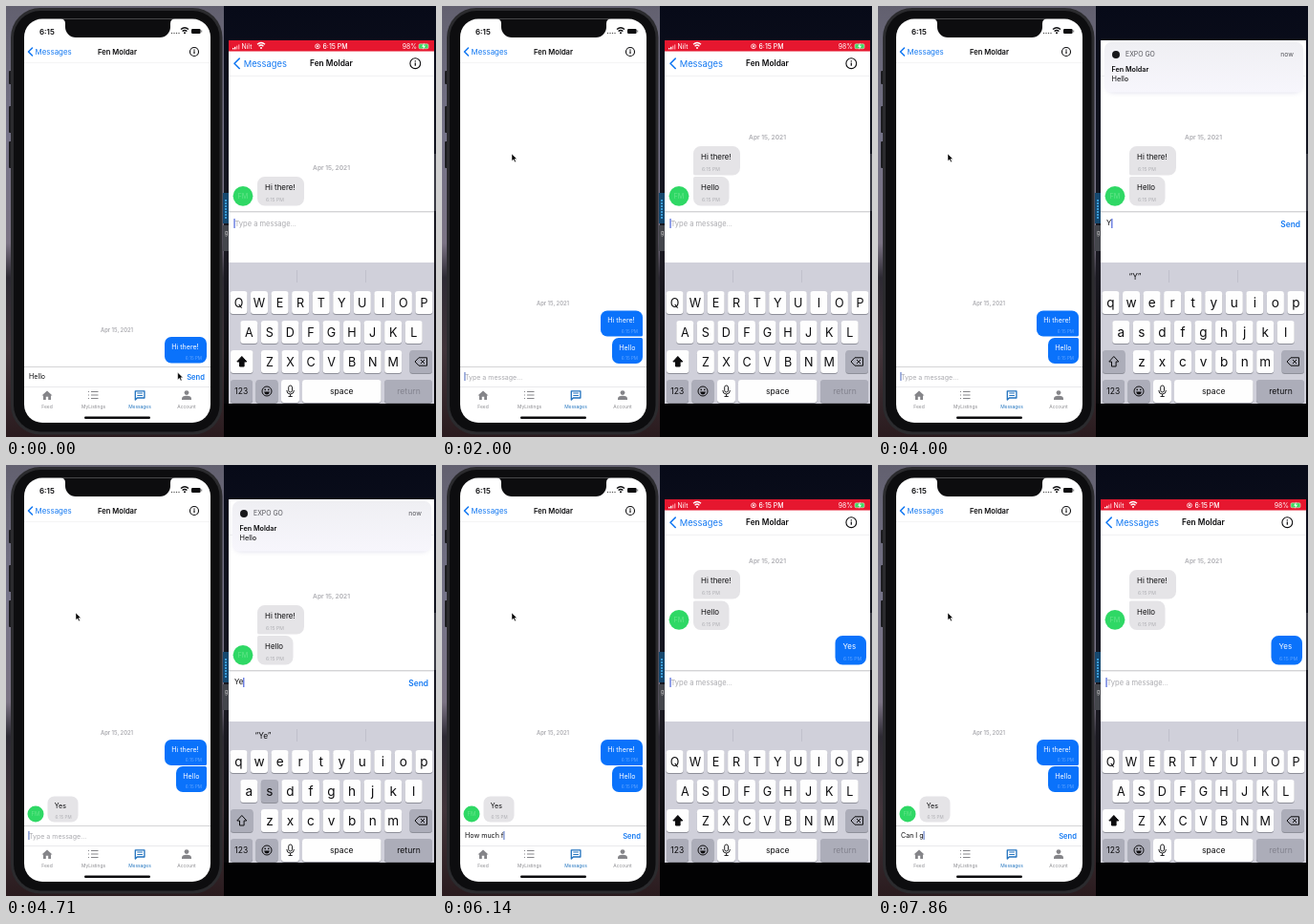
Recreate the animation shown at these times as an HTML page. Size 450x452 px, loop 8000 ms.

```html
<!DOCTYPE html>
<html lang="en">
<head>
<meta charset="utf-8">
<title>Chat on two phones</title>
<style>
  html, body { margin: 0; width: 100%; height: 100%; overflow: hidden; background: #000; }
  svg { display: block; width: 100%; height: 100%; font-family: Inter, Roboto, sans-serif; }
  text { white-space: pre; }
</style>
</head>
<body>
<svg id="stage" viewBox="0 0 450 452"></svg>
<script>
const LOOP = 8000;
const BLUE = '#0a72fb', LINK = '#1479f2', GREY = '#e5e4e7', GREEN = '#2fd865', INK = '#0c0c0e';
const KEY = '#fefefe', DARK_KEY = '#acadb9', BEZEL = '#0d0d0f';
const CONTACT = 'Fen Moldar', INITIALS = 'FM', CARRIER = 'Nilt', DAY = 'Apr 15, 2021';
const $ = id => document.getElementById(id);

// ---- drawing helpers; text is centred vertically on y ----
const text = (x, y, size, str, fill = INK, anchor = 'start', more = '') =>
  `<text x="${x}" y="${y + size * .36}" font-size="${size}" fill="${fill}" text-anchor="${anchor}" ${more}>${str}</text>`;
const rect = (x, y, w, h, fill, rx = 0, more = '') =>
  `<rect x="${x}" y="${y}" width="${w}" height="${h}" rx="${rx}" fill="${fill}" ${more}/>`;
const circle = (x, y, r, fill, more = '') => `<circle cx="${x}" cy="${y}" r="${r}" fill="${fill}" ${more}/>`;
const line = (d, stroke, w = 1, more = '') =>
  `<path d="${d}" fill="none" stroke="${stroke}" stroke-width="${w}" ${more}/>`;
const shape = (d, fill, more = '') => `<path d="${d}" fill="${fill}" ${more}/>`;
const group = (id, body, more = '') => `<g id="${id}" ${more}>${body}</g>`;
const bold = 'font-weight="600"';

// corner radii: top left, top right, bottom right, bottom left
const rounded = (x, y, w, h, [a, b, c, d]) =>
  `M${x + a} ${y}h${w - a - b}a${b} ${b} 0 0 1 ${b} ${b}v${h - b - c}a${c} ${c} 0 0 1 ${-c} ${c}` +
  `h${c + d - w}a${d} ${d} 0 0 1 ${-d} ${-d}v${d + a - h}a${a} ${a} 0 0 1 ${a} ${-a}z`;

function bubble(x, y, w, h, str, mine, scale, radii) {
  const ink = mine ? '#fff' : INK, faint = mine ? '#62a5ff' : '#aeaeb3';
  const stamp = mine ? [x + w - 5, 'end'] : [x + 8 * scale, 'start'];
  return shape(rounded(x, y, w, h, radii.map(r => r * scale)), mine ? BLUE : GREY) +
    text(x + 7.3 * scale, y + h * .37, 7.1 * scale, str, ink) +
    text(stamp[0], y + h * .8, 4.6 * scale, '6:15 PM', faint, stamp[1]);
}

const avatar = (x, y, r) => circle(x, y, r, GREEN) + text(x, y, r * .7, INITIALS, '#62e488', 'middle');
const info = (x, y, r) => circle(x, y, r, 'none', `stroke="${INK}" stroke-width="1.1"`) +
  line(`M${x} ${y - .8}v${r * .6}M${x} ${y - r * .55}v1.2`, INK, 1.2);
const wifi = (x, y, fill) => line(`M${x - 4} ${y - 2}q4 -3.6 8 0M${x - 2.4} ${y}q2.4 -2.2 4.8 0`, fill, 1.4) +
  circle(x, y + 1.7, 1, fill);
const chevron = (x, y, r) => line(`M${x + r} ${y - r}l${-r} ${r}l${r} ${r}`, LINK, 1.6,
  'stroke-linecap="round" stroke-linejoin="round"');

// ---- backdrop ----
function backdrop() {
  return `<defs>
    <linearGradient id="sky" x2="0" y2="1"><stop stop-color="#62606f"/><stop offset=".3" stop-color="#757388"/>
      <stop offset=".55" stop-color="#7b7384"/><stop offset=".63" stop-color="#2d2a33"/>
      <stop offset=".8" stop-color="#41343a"/><stop offset="1" stop-color="#2a1b1e"/></linearGradient>
    <linearGradient id="night" x2="0" y2="1"><stop stop-color="#070a18"/><stop offset=".35" stop-color="#12141f"/>
      <stop offset=".6" stop-color="#1b1a22"/><stop offset="1" stop-color="#020203"/></linearGradient>
    <linearGradient id="card" x2="0" y2="1"><stop stop-color="#efeff3"/><stop offset="1" stop-color="#f7f6fc"/></linearGradient>
    <filter id="soft" x="-10%" y="-20%" width="120%" height="150%"><feGaussianBlur stdDeviation="2.5"/></filter>
    <clipPath id="screen">${rect(233, 36, 215, 381, '#fff')}</clipPath></defs>` +
    rect(0, 0, 228, 452, 'url(#sky)') + rect(228, 0, 222, 452, 'url(#night)') +
    rect(228, 417, 222, 35, '#020203') + rect(448, 155, 2, 60, '#3a3b44') +
    rect(227, 196, 6, 32, '#16486e') + line('M230 203v21', '#3a9bd6', 2, 'stroke-dasharray="2 1"') +
    rect(227, 230, 6, 27, '#44464c') + text(230.5, 238, 6, 'g', '#c8c8c8', 'middle');
}

// ---- left phone ----
function leftPhone() {
  const buttons = [[68, 14], [105, 28], [142, 28]].map(([y, h]) => rect(3, y, 3, h, '#1b1b1e', 1)).join('');
  const tabs = [[43, 'Feed'], [91.5, 'MyListings'], [140, 'Messages'], [189, 'Account']]
    .map(([x, name]) => text(x, 420, 4.9, name, name === 'Messages' ? '#2677c0' : '#8c8c90', 'middle')).join('');
  const icons = shape('M37.5 408.5l5.5 -5l5.5 5h-1.5v4.5h-2.8v-3.2h-2.4v3.2h-2.8v-4.5z', '#858589') +
    line('M87 404.5h-1M87 408h-1M87 411.5h-1M89 404.5h7.5M89 408h7.5M89 411.5h7.5', '#858589', 1.2) +
    line('M135.3 413v-9.2h9.6v7.2h-7.6z', '#2172be', 1.3, 'stroke-linejoin="round"') +
    line('M137.3 406h5.6M137.3 408.5h5.6', '#2172be', 1) +
    circle(189, 405.6, 2.4, '#858589') + shape('M184 413v-1.2q0 -3 5 -3t5 3v1.2z', '#858589');
  return buttons + rect(5, 2, 221.5, 447.5, '#2b2b2e', 31) + rect(8, 5, 215.5, 441.5, BEZEL, 28) +
    rect(19, 13.5, 195, 423.5, '#fff', 19) +
    shape('M57 13.5q5 0 5 5v3.5a11 11 0 0 0 11 11h88a11 11 0 0 0 11 -11v-3.5q0 -5 5 -5z', BEZEL) +
    text(35, 27, 7.9, '6:15', INK, 'start', bold) +
    [173.5, 176, 178.5, 181].map(x => circle(x, 28.5, .7, '#555')).join('') + wifi(187, 26.5, INK) +
    rect(194, 24, 9.6, 5, INK, 1.2) + rect(204.2, 25.5, 1, 2, '#777') +
    chevron(23.5, 48, 4) + text(30.6, 48, 7.9, 'Messages', LINK) +
    text(116.5, 48, 7.6, CONTACT, INK, 'middle', bold) + info(197, 48, 4.5) +
    line('M19 59.5h195', '#ececee', .6) +
    group('leftOld', text(116, 339.5, 5.8, DAY, '#adadb2', 'middle', bold) +
      group('leftSolo', bubble(166, 347, 44, 27.5, 'Hi there!', true, 1, [7, 7, 7, 7])) +
      group('leftFirst', bubble(166, 347, 44, 27, 'Hi there!', true, 1, [7, 7, 1.5, 7]))) +
    group('leftSent', bubble(178, 348, 32, 27, 'Hello', true, 1, [7, 1.5, 7, 7])) +
    group('leftReply', avatar(31, 366, 8.5) + bubble(43.5, 347.5, 32, 27, 'Yes', false, 1, [7, 7, 7, 7])) +
    line('M19 378.5h195', '#c9c9cc', .8) +
    text(24, 389, 7, 'Type a message...', '#a9a9ae', 'start', 'id="leftHint"') +
    text(24, 388, 7.1, '', INK, 'start', 'id="leftText"') +
    rect(0, 384, .9, 9, '#3a5bb8', 0, 'id="leftCaret"') +
    text(208, 389.5, 7.6, 'Send', LINK, 'end', 'id="leftSend" ' + bold) +
    line('M19 399.5h195', '#dcdcdf', .6) + icons + tabs + rect(82, 430.5, 69, 2.4, INK, 1.2);
}

// ---- right phone ----
const PITCH = 21.55;
const keyRows = [['QWERTYUIOP', 243.5, 299], ['ASDFGHJKL', 254.3, 330], ['ZXCVBNM', 275.9, 361]];
const key = (x, y, w, fill, id = '') => rect(x, y + 1, w, 24, '#8e8f99', 3.2) + rect(x, y, w, 24, fill, 3.2, id && `id="${id}"`);

function keyboard() {
  const letters = keyRows.map(([row, x0, y]) => [...row].map((c, i) => {
    const x = x0 + i * PITCH;
    return key(x - 9, y, 18, KEY, 'key' + c) + text(x, y + 12, 12.6, c, INK, 'middle', 'class="letter"');
  }).join('')).join('');
  return rect(233, 269, 215, 148, '#d0d0da') +
    line('M304.5 277v13M376.5 277v13', '#bcbcc8', .8) +
    text(269, 284, 8.4, '', INK, 'middle', 'id="guess"') + letters +
    key(235, 361, 23.5, KEY, 'shift') +
    shape('M246.8 367.5l5 5.5h-2.7v5h-4.6v-5h-2.7z', INK, `id="arrow" stroke="${INK}" stroke-width="1" stroke-linejoin="round"`) +
    key(422.5, 361, 23.5, DARK_KEY) +
    line('M428 373l4 -4.2h8.5v8.4h-8.5zM434 371l4 4M438 371l-4 4', INK, 1, 'stroke-linejoin="round"') +
    key(235, 392, 23, DARK_KEY) + text(246.3, 404, 8.5, '123', INK, 'middle') +
    key(261.5, 392, 23, DARK_KEY) + circle(273, 404, 5, 'none', `stroke="${INK}"`) +
    circle(271.2, 402.4, .8, INK) + circle(274.8, 402.4, .8, INK) + shape('M270 404.6h6q-.6 2.8 -3 2.8t-3 -2.8z', INK) +
    key(288, 392, 19, KEY) + rect(295.7, 398, 3.8, 7, 'none', 1.9, `stroke="${INK}" stroke-width=".9"`) +
    line('M293.8 403q0 4 3.8 4t3.8 -4M297.6 407v2.4M295.5 409.5h4.2', INK, .9) +
    key(310, 392, 82.5, KEY) + text(351.3, 404, 8.6, 'space', INK, 'middle') +
    key(396, 392, 50, DARK_KEY) + text(421.5, 404, 8.6, 'return', INK, 'middle', 'id="return"');
}

function rightPhone() {
  const bars = [0, 1, 2, 3].map(i => rect(237 + i * 2, 44 - i * 1.2, 1.4, 1.5 + i * 1.2, i < 2 ? '#fff' : '#ff8a96')).join('');
  const status = rect(233, 36, 215, 11.5, '#e6172f') + bars + text(246.5, 42.3, 6.9, CARRIER, '#fff') +
    wifi(267, 42.2, '#fff') + circle(326, 42.3, 2.4, 'none', 'stroke="#fff" stroke-width=".8"') + circle(326, 42.3, 1.1, '#fff') +
    text(331.5, 42.3, 6.9, '6:15 PM', '#fff', 'start', 'font-weight="500"') +
    text(430, 42.3, 6.9, '98%', '#fff', 'end') + rect(432, 39.8, 10, 5, '#3ddc62', 1.2, 'stroke="#ffd0d4" stroke-width=".6"') +
    shape('M437.8 38.5l-2.6 4.2h1.8l-.8 3.4l2.8 -4.4h-1.9z', '#fff');
  const banner = rect(239, 44, 204, 47, '#9a9ac0', 7, 'filter="url(#soft)" opacity=".3"') +
    rect(237, 38, 208, 52.5, 'url(#card)', 7) + circle(249, 51, 4, '#17171a') +
    text(259, 51, 6.9, 'EXPO GO', '#55555b') + text(435, 51, 6.9, 'now', '#55555b', 'end') +
    text(244.5, 66.3, 7.2, CONTACT, INK, 'start', bold) + text(244.5, 76.3, 7.3, 'Hello');
  return rect(233, 36, 215, 381, '#fff') +
    group('rightOld', text(340.5, 169.5, 6.6, DAY, '#adadb2', 'middle', bold) +
      group('rightSolo', bubble(263, 179, 49, 30.5, 'Hi there!', false, 1.11, [7, 7, 7, 7])) +
      group('rightFirst', bubble(263, 179, 49, 30.5, 'Hi there!', false, 1.11, [7, 7, 7, 1.5]))) +
    group('rightNew', bubble(263, 179, 37.5, 30.5, 'Hello', false, 1.11, [1.5, 7, 7, 7])) +
    group('rightFace', avatar(248, 199.3, 10.4)) +
    group('rightSent', bubble(411.5, 179, 32.5, 30.5, 'Yes', true, 1.11, [7, 7, 7, 7])) +
    rect(233, 47, 215, 26, '#fff') + line('M233 73.3h215', '#e4e4e7', .6) +
    chevron(239, 60.3, 5.2) + text(248.7, 60.5, 9.4, 'Messages', LINK) +
    text(340.5, 60.4, 8.3, CONTACT, INK, 'middle', bold) + info(428.3, 60.2, 5.4) +
    group('status', status) + group('banner', banner) +
    line('M233 215.8h215', '#bcbcc0', .9) +
    text(239.5, 228.7, 7.5, 'Type a message...', '#a9a9ae', 'start', 'id="rightHint"') +
    text(239, 227.5, 7.8, '', INK, 'start', 'id="rightText"') +
    rect(0, 223, 1.1, 10, '#3c56d8', 0, 'id="rightCaret"') +
    text(442, 229.2, 8.4, 'Send', LINK, 'end', 'id="rightSend" ' + bold) + keyboard();
}

$('stage').innerHTML = backdrop() + leftPhone() + group('phone2', rightPhone(), 'clip-path="url(#screen)"') +
  shape('M0 0v7.6l1.8 -1.6l1.3 2.8l1.3 -.6l-1.3 -2.7h2.4z', '#000', 'id="mouse" stroke="#fff" stroke-width=".5"');

// ---- motion ----
const clamp = v => Math.max(0, Math.min(1, v));
const ease = (t, a, b) => { const p = clamp((t - a) / (b - a)); return p * p * (3 - 2 * p); };
const show = (id, on) => $(id).setAttribute('opacity', on ? 1 : 0);
const shift = (id, x, y) => $(id).setAttribute('transform', `translate(${x} ${y})`);
const typed = (str, t, start, step) => str.slice(0, Math.max(0, Math.floor((t - start) / step) + 1));

function leftDraft(t) {
  if (t < 280) return 'Hello';
  if (t < 5300) return '';
  if (t < 7130) return typed('How much for this ', t, 5310, 86);
  return typed('Can I g', t, 7270, 96);
}
const rightDraft = t => t < 3990 || t >= 4990 ? '' : t < 4420 ? 'Y' : t < 4840 ? 'Ye' : 'Yes';
const pressedKey = t => t >= 3850 && t < 3990 ? 'Y' : t >= 4280 && t < 4420 ? 'E' : t >= 4700 && t < 4840 ? 'S' : '';

function field(side, str, x, blink) {
  const el = $(side + 'Text');
  if (el.textContent !== str) el.textContent = str;
  show(side + 'Hint', !str);
  show(side + 'Send', str);
  show(side + 'Caret', blink);
  $(side + 'Caret').setAttribute('x', x + (str ? el.getComputedTextLength() : -.5));
}

let caps = true;
function setCaps(on) {
  if (on === caps) return;
  caps = on;
  document.querySelectorAll('.letter').forEach(el => {
    el.textContent = on ? el.textContent.toUpperCase() : el.textContent.toLowerCase();
    el.setAttribute('font-size', on ? 12.6 : 13.6);
  });
  $('shift').setAttribute('fill', on ? KEY : DARK_KEY);
  $('arrow').setAttribute('fill', on ? INK : 'none');
}

function draw(t) {
  const sent = t >= 420, got = t >= 1140, reply = t >= 4560, answered = t >= 5130;

  shift('leftOld', 0, reply ? -59 : sent ? -27.5 : 0);
  shift('leftSent', 0, reply ? -32 : 0);
  show('leftSolo', !sent); show('leftFirst', sent);
  show('leftSent', sent); show('leftReply', reply);

  shift('rightOld', 0, answered ? -69 : got ? -32 : 0);
  shift('rightNew', 0, answered ? -36.5 : 0);
  shift('rightFace', 0, answered ? -37 : 0);
  show('rightSolo', !got); show('rightFirst', got);
  show('rightNew', got); show('rightSent', answered);

  const down = ease(t, 2430, 2860) - ease(t, 5130, 5480);
  shift('banner', 0, -64 * (1 - down));
  show('banner', down > 0);
  $('status').setAttribute('opacity', 1 - ease(t, 2430, 2700) + ease(t, 5280, 5720));

  const go = ease(t, 430, 1140);
  shift('mouse', 179.7 - 106.7 * go, 384.3 - 229.3 * go);

  const left = leftDraft(t), right = rightDraft(t);
  const on = (t + 430) % 1000 < 560;
  field('left', left, 24, t > 280 && (on || (left && t < 6800) || t > 7270));
  field('right', right, 239, right || (t + 300) % 1000 < 650);

  const press = pressedKey(t);
  for (const c of 'YES') $('key' + c).setAttribute('fill', c === press ? DARK_KEY : KEY);
  const guess = right ? `“${right}”` : '';
  if ($('guess').textContent !== guess) $('guess').textContent = guess;
  $('return').setAttribute('fill', right ? INK : '#83838e');
  setCaps(!right);
}

const start = performance.now();
function tick() {
  draw((performance.now() - start) % LOOP);
  requestAnimationFrame(tick);
}
tick();
</script>
</body>
</html>
```
